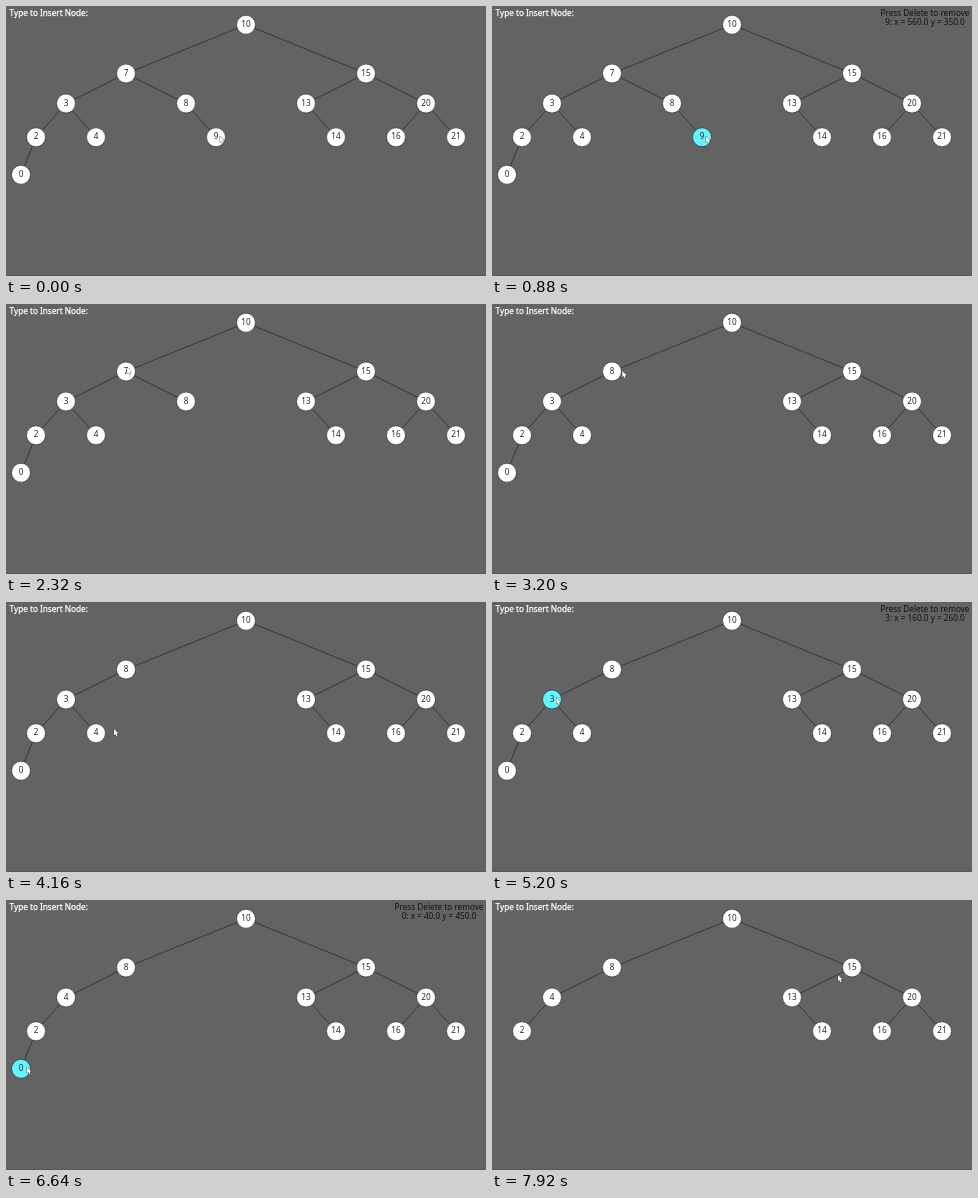
Animation of 480 by 270 pixels, one loop 8 s. Source, as an HTML page with a canvas:

```html
<!DOCTYPE html>
<html lang="en">
<head>
<meta charset="utf-8">
<style>
html, body { margin: 0; width: 100%; height: 100%; overflow: hidden; background: #636363; }
canvas { display: block; width: 480px; height: 270px; }
</style>
</head>
<body>
<canvas id="stage" width="480" height="270"></canvas>
<script>
const ctx = document.getElementById('stage').getContext('2d');
const LOOP = 8000, STEP = 80, SCALE = 0.375, RADIUS = 9.4;
const ROWS = [50, 180, 260, 350, 450];
const KEYS = [10, 7, 15, 3, 8, 13, 20, 2, 4, 9, 14, 16, 21, 0];

// When each key is clicked and then deleted.
const removals = [
  { key: 9, select: 320, remove: 1120 },
  { key: 7, select: 2800, remove: 3120 },
  { key: 3, select: 4800, remove: 5440 },
  { key: 0, select: 6480, remove: 6800 }
];
// Cursor stops: arrival, departure, x, y.
const stops = [
  [0, 1440, 214, 130], [2320, 3120, 121, 63.5], [3600, 3600, 177, 85],
  [4160, 4160, 108, 127], [4640, 5440, 64.5, 95.5], [6160, 6160, 46, 163],
  [6400, 6800, 21, 167], [7040, 7040, 105, 144], [7360, 7520, 406, 78],
  [7920, LOOP, 346, 75]
];

// Binary search insertion; the horizontal offset halves on every level.
function insert(node, key, depth = 0, x = 640) {
  if (!node) return { key, x, y: ROWS[depth] };
  const side = key < node.key ? 'left' : 'right';
  const offset = 320 / 2 ** depth * (side === 'left' ? -1 : 1);
  node[side] = insert(node[side], key, depth + 1, x + offset);
  return node;
}

// A right child takes the place of the removed key.
function remove(node, key) {
  if (!node) return null;
  if (node.key === key) {
    if (!node.right) return null;
    node.key = node.right.key;
    node.right = null;
  } else {
    const side = key < node.key ? 'left' : 'right';
    node[side] = remove(node[side], key);
  }
  return node;
}

function cursorAt(t) {
  const i = stops.findIndex(s => t < s[1]);
  const [arrive, , x, y] = stops[i];
  if (t >= arrive) return [x, y];
  const [, leave, x0, y0] = stops[i - 1];
  const k = (t - leave) / (arrive - leave);
  return [x0 + (x - x0) * k, y0 + (y - y0) * k];
}

function text(str, x, y, color, align = 'center') {
  ctx.fillStyle = color;
  ctx.textAlign = align;
  ctx.fillText(str, x, y);
}

function drawEdges(node) {
  for (const child of [node.left, node.right]) {
    if (!child) continue;
    ctx.beginPath();
    ctx.moveTo(node.x * SCALE, node.y * SCALE);
    ctx.lineTo(child.x * SCALE, child.y * SCALE);
    ctx.stroke();
    drawEdges(child);
  }
}

function drawNodes(node, selectedKey) {
  if (!node) return;
  const x = node.x * SCALE, y = node.y * SCALE, selected = node.key === selectedKey;
  ctx.beginPath();
  ctx.arc(x, y, RADIUS, 0, 2 * Math.PI);
  ctx.fillStyle = selected ? '#64f5ff' : '#fff';
  ctx.fill();
  ctx.stroke();
  text(node.key, x, y + 2.2, '#2a2a2a');
  if (selected) {
    text('Press Delete to remove', 433, 9.5, '#111');
    text(`${node.key}: x = ${node.x}.0 y = ${node.y}.0`, 433, 18.8, '#111');
  }
  drawNodes(node.left, selectedKey);
  drawNodes(node.right, selectedKey);
}

function drawCursor(x, y) {
  const arrow = new Path2D('M0 0V6.2L1.4 5L2.4 7.2L3.4 6.8L2.5 4.6L4.4 4.5Z');
  ctx.save();
  ctx.translate(x, y);
  ctx.strokeStyle = '#333';
  ctx.lineWidth = 0.7;
  ctx.stroke(arrow);
  ctx.fillStyle = '#fff';
  ctx.fill(arrow);
  ctx.restore();
}

function draw(t) {
  let tree = KEYS.reduce((root, key) => insert(root, key), null);
  for (const r of removals) if (t >= r.remove) tree = remove(tree, r.key);
  const active = removals.find(r => t >= r.select && t < r.remove);

  ctx.fillStyle = '#636363';
  ctx.fillRect(0, 0, 480, 270);
  ctx.fillStyle = '#5c5458';
  ctx.fillRect(0, 269, 480, 1);

  ctx.font = '8.2px "Noto Sans", sans-serif';
  ctx.strokeStyle = '#000';
  ctx.lineWidth = 0.45;
  drawEdges(tree);
  drawNodes(tree, active?.key);

  text('Type to Insert Node:', 3.6, 9.5, '#fff', 'left');
  ctx.strokeStyle = '#fff';
  ctx.lineWidth = 0.25;
  ctx.strokeText('Type to Insert Node:', 3.6, 9.5);
  drawCursor(...cursorAt(t));
}

function tick() {
  const t = performance.now() % LOOP;
  draw(Math.floor(t / STEP) * STEP);
  requestAnimationFrame(tick);
}
tick();
</script>
</body>
</html>
```
